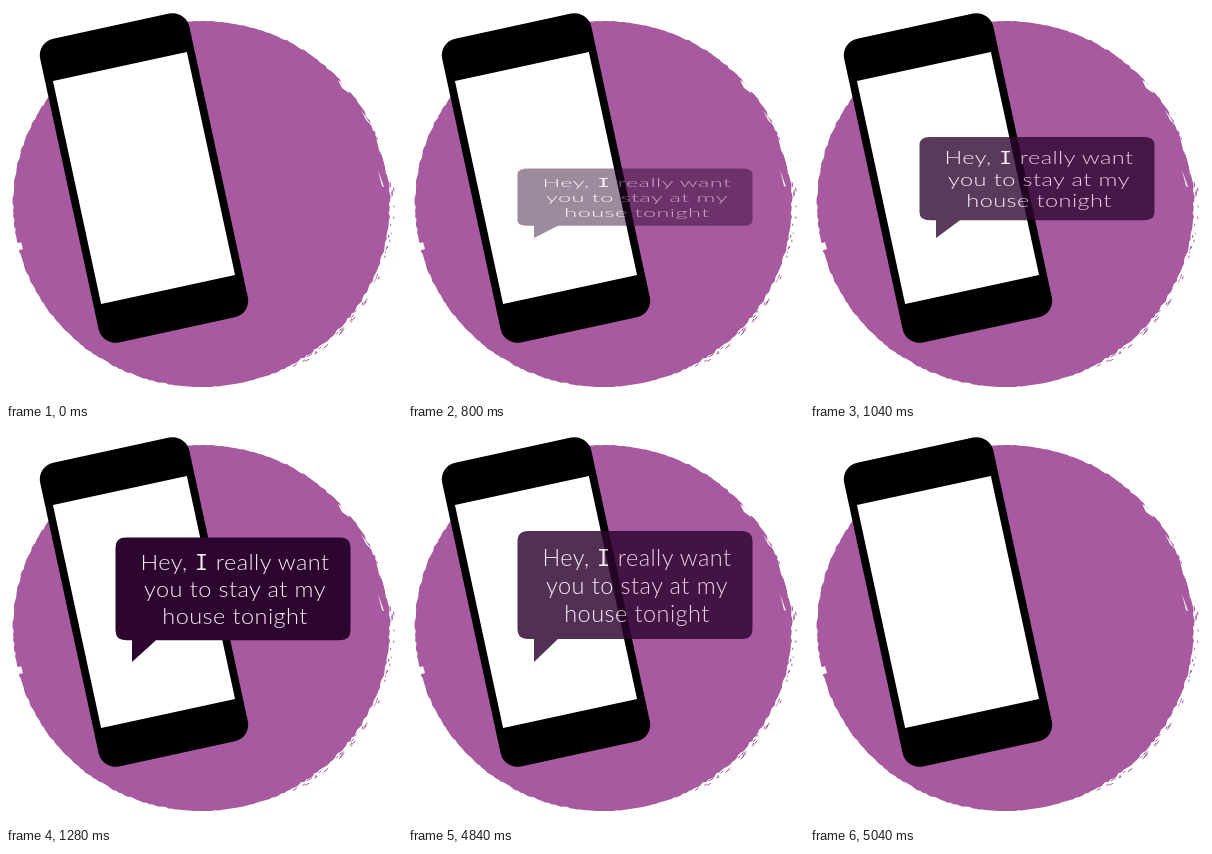
Write an HTML page that moves like this. It is 396 px wide and 396 px high and loops after 5.8 s.

```html
<!DOCTYPE html>
<html lang="en">
<head>
<meta charset="utf-8">
<title>Message</title>
<style>
html, body { margin: 0; width: 100%; height: 100%; overflow: hidden; background: #fff; }
svg { display: block; width: 100%; height: 100%; }
text { font: 300 23.5px Lato, "Open Sans", sans-serif; letter-spacing: .45px; fill: #fbeafa; text-anchor: middle; }
.serif { font-family: "Noto Sans Mono", monospace; }
</style>
</head>
<body>
<svg viewBox="0 0 396 396">
  <g fill="#a75a9f">
    <path id="disc"/>
    <path id="flecks" fill="none" stroke="#a75a9f"/>
  </g>
  <g fill="#fff">
    <path d="M370 131Q380 146 383 170L380 168Q378 152 373 144Z"/>
    <path d="M332 74L342 81L343 87L336 82Z"/>
    <path d="M311 50L328 61L320 58Z"/>
    <path d="M284 35L303 40L293 39Z"/>
    <path d="M355 104L366 120L360 114Z"/>
    <path d="M372 164L378 181L376 180Z"/>
    <path d="M6 229Q10 240 15 236L17 243L8 246Z"/>
  </g>
  <g transform="translate(138 172) rotate(-12.2)">
    <rect x="-76.3" y="-155.4" width="152.6" height="310.8" rx="17"/>
    <rect x="-68.5" y="-114" width="137" height="228" fill="#fff"/>
  </g>
  <g id="bubble">
    <path fill="#2d0630" d="M120 101H334Q344.5 101 344.5 111.500V198.500Q344.5 209 334 209H150L126 232V209H120Q109.500 209 109.500 198.500V111.500Q109.500 101 120 101Z"/>
    <text x="229" y="135.500">Hey, <tspan class="serif">I</tspan> really want</text>
    <text x="229" y="164">you to stay at my</text>
    <text x="229" y="192">house tonight</text>
  </g>
</svg>
<script>
const LOOP = 5800, BASE = 232;
const $ = id => document.getElementById(id);
const ramp = (t, t0, t1, a, b) => a + (b - a) * Math.min(1, Math.max(0, (t - t0) / (t1 - t0)));

let seed = 11;
const rand = () => (seed = seed * 16807 % 2147483647) / 2147483647;

const rim = (deg, out) => {
  const a = deg * Math.PI / 180;
  return `${(195.5 + (188.5 + out) * Math.cos(a)).toFixed(1)} ${(198 + (183 + out) * Math.sin(a)).toFixed(1)}`;
};

// Disc with a dry-brush edge: smooth at the top, rougher to the right and lower left
function drawDisc() {
  const pts = [];
  for (let d = 0; d < 360; d += 1) {
    const rough = d < 70 || d > 295 ? 1.8 : d > 100 && d < 215 ? 1.3 : .5;
    pts.push(rim(d, (rand() - .6) * rough));
  }
  $('disc').setAttribute('d', 'M' + pts.join('L') + 'Z');

  let d = '';
  for (let i = 0; i < 46; i++) {
    const a = -7 + 68 * rand() ** 1.3, out = 1 + rand() * 3.5;
    d += `M${rim(a, out)}L${rim(a + .3 + rand() * 1.4, out + rand() - .5)}`;
  }
  $('flecks').setAttribute('d', d);
}

function draw(t) {
  const scale = t < 1200 ? ramp(t, 600, 1200, .33, .93) : ramp(t, 1200, 1480, .93, 1);
  const alpha = t < 640 ? 0 : t < 4800 ? ramp(t, 600, 1200, .2, 1) : ramp(t, 4800, 5040, 1, 0);
  $('bubble').setAttribute('transform', `translate(0 ${BASE}) scale(1 ${scale}) translate(0 ${-BASE})`);
  $('bubble').setAttribute('opacity', alpha);
}

drawDisc();
draw(0);
const start = performance.now();
(function tick() {
  draw((performance.now() - start) % LOOP);
  requestAnimationFrame(tick);
})();
</script>
</body>
</html>
```
